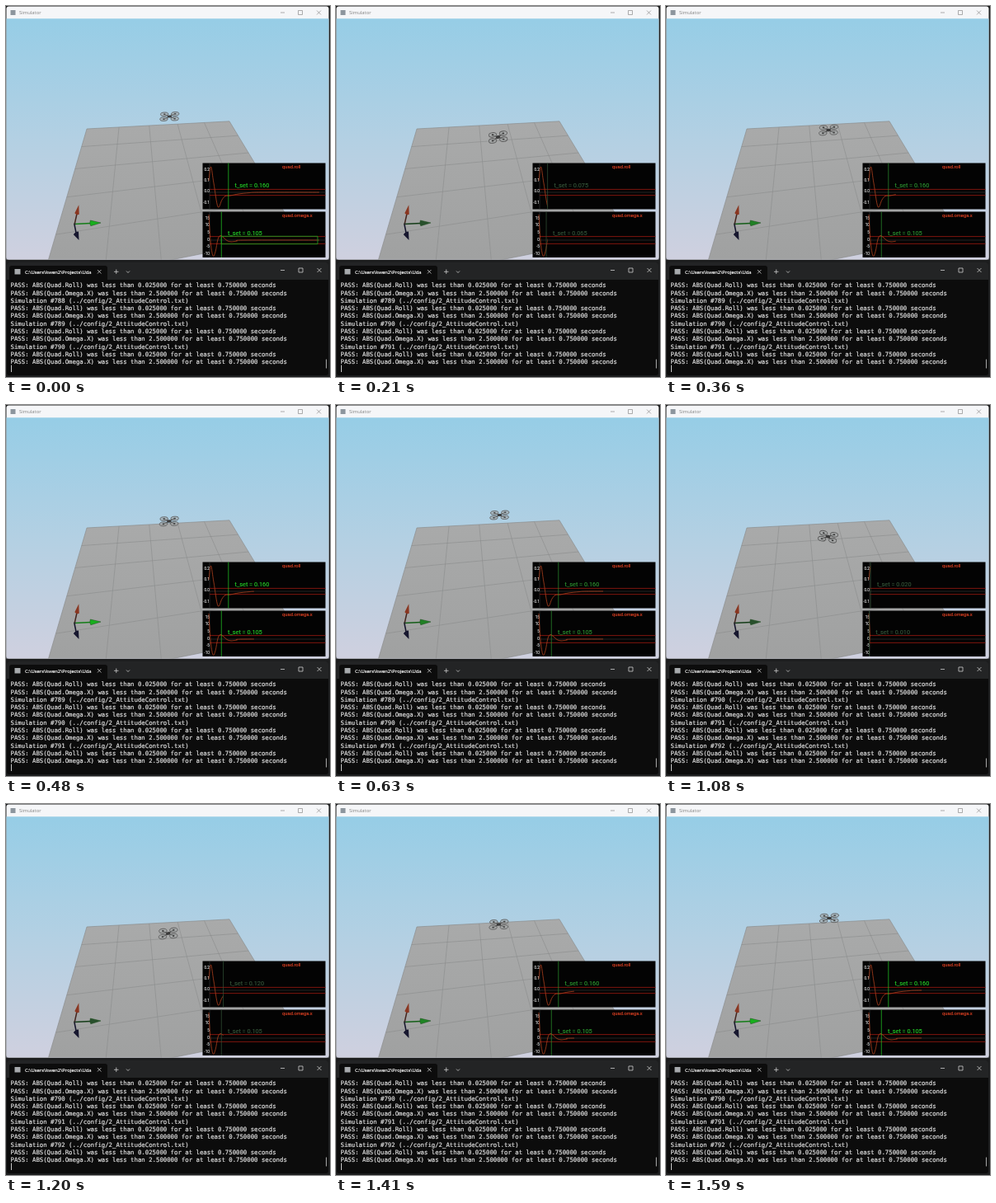
Recreate the animation shown at these times as an HTML page. Size 393x450 px, loop 1620 ms.

```html
<!DOCTYPE html>
<html lang="en">
<head>
<meta charset="utf-8">
<title>Simulator</title>
<style>
html, body { margin: 0; width: 100%; height: 100%; overflow: hidden; background: #1d1e1f; }
svg { display: block; width: 393px; height: 450px; }
.ui { font: 5.9px "Open Sans", "Noto Sans", sans-serif; }
.tab { fill: #f2f2f2; stroke: #f2f2f2; stroke-width: .2; }
.term { font: 7.33px "DejaVu Sans Mono", "Noto Sans Mono", monospace; fill: #dadada; stroke: #dadada; stroke-width: .22; white-space: pre; }
.plot { font: 7.3px Roboto, Inter, sans-serif; stroke-width: .15; }
.tick { font: 4.6px Roboto, Inter, sans-serif; fill: #dcdcdc; stroke: #dcdcdc; stroke-width: .12; text-anchor: end; }
.name { font: 5.8px Roboto, Inter, sans-serif; fill: #cc3c20; stroke: #cc3c20; stroke-width: .2; }
</style>
</head>
<body>
<svg id="stage" viewBox="0 0 393 450">
  <defs>
    <linearGradient id="sky" x1="0" y1="0" x2="0" y2="1">
      <stop offset="0" stop-color="#96cde6"/>
      <stop offset=".5" stop-color="#b3d0e3"/>
      <stop offset="1" stop-color="#cfd0df"/>
    </linearGradient>
    <linearGradient id="slab" gradientUnits="userSpaceOnUse" x1="0" y1="140" x2="0" y2="307">
      <stop offset="0" stop-color="#a9aaaa"/>
      <stop offset="1" stop-color="#a0a1a1"/>
    </linearGradient>
    <clipPath id="view"><rect x=".5" y="15.300" width="391" height="292.200"/></clipPath>
    <clipPath id="drawn"><rect id="reveal" x="238" y="190" width="0" height="116"/></clipPath>
    <clipPath id="panels"><path d="M238.500 190.600H387.500V246.500H238.500ZM238.500 249.500H387.500V305H238.500Z"/></clipPath>
  </defs>

  <rect x=".5" y=".4" width="391" height="307.100" rx="3" fill="#f5f6f8"/>
  <rect x=".5" y="15.300" width="391" height="292.200" fill="url(#sky)"/>
  <rect x="5.500" y="5" width="6" height="6" fill="#8d969e"/>
  <text class="ui" x="16" y="10.300" fill="#808080">Simulator</text>
  <path d="M333 8h5M354.500 5.500h5v5h-5zM377 5.500l5 5m0-5l-5 5" fill="none" stroke="#8c8c8c" stroke-width=".7"/>

  <g clip-path="url(#view)">
    <path id="floor" fill="url(#slab)" stroke="#858686" stroke-width=".6"/>
    <path id="grid" fill="none" stroke="#8a8b8b" stroke-width=".6"/>
    <path d="M83.300 264L86 252" stroke="#45261f" stroke-width="1.500"/>
    <path d="M88.300 241.300L83.300 251.300Q85.500 254 88.700 252.800Z" fill="#8a3620"/>
    <path d="M83 265L85 275" stroke="#14142c" stroke-width="1.500"/>
    <path d="M88.500 284L81.800 277.200Q83.800 273.700 88 273.500Z" fill="#17172f"/>
    <path id="shaft" d="M83 264.500L103 263.500" stroke-width="1.700"/>
    <path id="cone" d="M115 263L102.300 260Q101 264 102.800 266.800Z" stroke="#1c4a1c" stroke-width=".5"/>
    <circle cx="83.300" cy="264.500" r="1.200" fill="#2c2c2c"/>
    <g id="drone"></g>
  </g>

  <path d="M238.500 190.600H387.500V246.500H238.500ZM238.500 249.500H387.500V305H238.500Z" fill="#030303"/>
  <g id="plots" clip-path="url(#panels)"></g>

  <rect x="1" y="311" width="390" height="137" rx="3" fill="#0c0c0c"/>
  <path d="M1 332V314a3 3 0 0 1 3-3H388a3 3 0 0 1 3 3V332Z" fill="#232425"/>
  <path d="M4 332V318a3 3 0 0 1 3-3H120a3 3 0 0 1 3 3V332Z" fill="#0c0c0c"/>
  <rect x="10.500" y="319" width="7" height="6.500" fill="#a6a9ac"/>
  <text class="ui tab" x="23" y="324.500">C:\Users\kwen2\Projects\Uda</text>
  <path d="M111 320l4.500 4.500m0-4.500l-4.500 4.500M131 322.300h5.500M133.750 319.500v5.500M146 321.500l2 2l2-2M333 320.500h5M355 318h5v5h-5zM377.500 318l5 5m0-5l-5 5" fill="none" stroke="#ccc" stroke-width=".8"/>
  <g id="log" class="term"></g>
  <path d="M6.500 435.500v8.500" stroke="#ddd" stroke-width=".9"/>
  <path d="M388.500 428.500v11" stroke="#a0a0a0" stroke-width="1.100"/>
</svg>

<script>
const $ = id => document.getElementById(id);
const mix = (a, b, f) => a + (b - a) * f;
const clamp = (v, lo, hi) => Math.min(hi, Math.max(lo, v));

function add(parent, tag, attrs, text) {
  const el = document.createElementNS('http://www.w3.org/2000/svg', tag);
  for (const key in attrs) el.setAttribute(key, attrs[key]);
  if (text !== undefined) el.textContent = text;
  return parent.appendChild(el);
}

function along(keys, x) {
  let i = 1;
  while (i < keys.length - 1 && keys[i][0] < x) i++;
  const [a, b] = [keys[i - 1], keys[i]];
  return mix(a[1], b[1], clamp((x - a[0]) / (b[0] - a[0]), 0, 1));
}

// Smooth curve through points
function spline(p) {
  let d = `M${p[0]}`;
  for (let i = 0; i < p.length - 1; i++) {
    const a = p[i - 1] || p[i], b = p[i], c = p[i + 1], e = p[i + 2] || c;
    d += `C${b[0] + (c[0] - a[0]) / 6},${b[1] + (c[1] - a[1]) / 6} ` +
         `${c[0] - (e[0] - b[0]) / 6},${c[1] - (e[1] - b[1]) / 6} ${c}`;
  }
  return d;
}

// Maps the unit square onto four corners in perspective
function perspective([x0, y0], [x1, y1], [x2, y2], [x3, y3]) {
  const ax = x1 - x2, bx = x3 - x2, sx = x0 - x1 + x2 - x3;
  const ay = y1 - y2, by = y3 - y2, sy = y0 - y1 + y2 - y3;
  const den = ax * by - bx * ay;
  const g = (sx * by - bx * sy) / den, h = (ax * sy - sx * ay) / den;
  return (u, v) => {
    const w = 1 + g * u + h * v;
    const x = x0 + (x1 - x0 + g * x1) * u + (x3 - x0 + h * x3) * v;
    const y = y0 + (y1 - y0 + g * y1) * u + (y3 - y0 + h * y3) * v;
    return `${x / w},${y / w}`;
  };
}
const floorAt = perspective([98, 149], [271, 139.8], [354, 277], [42, 340]);
$('floor').setAttribute('d', `M${floorAt(0, 0)}L${floorAt(1, 0)}L${floorAt(1, 1)}L${floorAt(0, 1)}Z`);
let lines = '';
for (let i = 1; i < 5; i++) {
  const f = i / 5;
  lines += `M${floorAt(f, 0)}L${floorAt(f, 1)}M${floorAt(0, f)}L${floorAt(1, f)}`;
}
$('grid').setAttribute('d', lines);

// Drone
const drone = $('drone');
add(drone, 'path', { d: 'M-6.500 -3L6.500 3M6.500 -3L-6.500 3', stroke: '#444', 'stroke-width': 1.2 });
for (const [x, y] of [[-6, -3], [7, -3], [-7, 3], [6.3, 3]]) {
  add(drone, 'ellipse', { cx: x, cy: y, rx: 4.7, ry: 2.3, fill: '#a0a3a3', 'fill-opacity': .6, stroke: '#5a5a5a', 'stroke-width': .8 });
  add(drone, 'ellipse', { cx: x, cy: y, rx: 1.3, ry: .8, fill: '#3c3c3c' });
}
add(drone, 'ellipse', { cx: 0, cy: 0, rx: 2.6, ry: 1.6, fill: '#3a3a3a' });

// Plots
const plots = $('plots');
const X0 = 245, SCALE = 155;
const rollCurve = [[246, 212], [248.5, 195], [252, 215], [257, 243.5], [262, 235], [266, 230.5],
  [272, 230], [282, 228], [295, 226.6], [310, 226], [387, 226]];
const omegaCurve = [[246, 253], [248, 285], [251, 303], [254, 298], [257, 283], [260, 278.5],
  [264, 281], [268, 284.5], [273, 286], [280, 285], [290, 284], [387, 284]];

function makePlot(top, zero, band, ticks, step, name, nameX, curve) {
  add(plots, 'path', { d: `M247 ${top}v56M247 ${zero}H388`, stroke: '#3c3c3c', 'stroke-width': .6 });
  add(plots, 'path', { d: `M247 ${zero - band}H388M247 ${zero + band}H388`, stroke: '#9c1a11', 'stroke-width': .8 });
  ticks.forEach((label, i) => add(plots, 'text', { class: 'tick', x: 246.8, y: top + 8.5 + i * step }, label));
  add(plots, 'text', { class: 'name', x: nameX, y: top + 6.3 }, name);
  add(plots, 'path', { d: spline(curve), fill: 'none', stroke: '#b0401e', 'stroke-width': .8, 'clip-path': 'url(#drawn)' });
  const line = add(plots, 'path', { 'stroke-width': .7 });
  const text = add(plots, 'text', { class: 'plot' });
  return (settle, color, y) => {
    const x = X0 + settle * SCALE;
    line.setAttribute('d', `M${x} ${top - 1}v57`);
    line.setAttribute('stroke', color);
    text.setAttribute('x', x + 7.8);
    text.setAttribute('y', y);
    text.setAttribute('fill', color);
    text.setAttribute('stroke', color);
    text.textContent = `t_set = ${settle.toFixed(3)}`;
  };
}
const setRoll = makePlot(191, 226, 3.6, ['0.2', '0.1', '0.0', '-0.1'], 13.4, 'quad.roll', 335, rollCurve);
const setOmega = makePlot(250, 284, 4.4, ['15', '10', '5', '0', '-5', '-10'], 8.7, 'quad.omega.x', 335, omegaCurve);
const passBox = add(plots, 'path', { d: 'M261.300 279.300H378V288.700H261.300Z', fill: 'none', stroke: '#1f9a1f', 'stroke-width': .9 });

// Terminal
const pass = (what, limit) => `PASS: ABS(Quad.${what}) was less than ${limit} for at least 0.750000 seconds`;
const rows = [];
for (let i = 0; i < 11; i++) {
  const kind = i % 3;
  const text = kind === 0 ? pass('Roll', '0.025000') : kind === 1 ? pass('Omega.X', '2.500000') : '';
  rows.push(add($('log'), 'text', { x: 5.5, y: 341.4 + i * 9.27 }, text));
}

// Step index -> simulated seconds, then strength of the greens
const clock = [[0, .87], [2, .93], [3, 0], [5, .075], [13, .36], [17, .51], [24, .76], [28, .92],
  [29, .02], [32, .12], [43, .42]];
const glow = [[0, 1], [2, 1], [3, 0], [5, 0], [13, 1], [17, .5], [24, .4], [28, .8], [29, 0], [32, 0], [43, 1]];
const height = [[0, 160], [.075, 159], [.12, 157], [.36, 141], [.42, 138.5], [.51, 133.5], [.64, 131],
  [.76, 130.5], [.87, 134], [.93, 136]];
const LOOP = 1620, STEPS = 44;
const snap = v => Math.round(v * 200) / 200;

function draw(ms) {
  const slot = Math.floor((ms % LOOP) / 30);
  const k = Math.floor(slot * STEPS / 54);
  const t = along(clock, k), g = along(glow, k);
  const green = `rgb(${mix(54, 36, g)},${mix(86, 210, g)},${mix(58, 40, g)})`;
  const head = X0 + t * SCALE;

  $('reveal').setAttribute('width', head - 238);
  setRoll(snap(Math.min(t, .16)), green, 219.7);
  setOmega(snap(clamp(t - .01, 0, .105)), green, 277.7);
  passBox.setAttribute('visibility', t >= .855 ? 'visible' : 'hidden');

  $('shaft').setAttribute('stroke', `rgb(20,${mix(60, 125, g)},24)`);
  $('cone').setAttribute('fill', `rgb(${mix(40, 24, g)},${mix(80, 175, g)},${mix(44, 30, g)})`);

  const y = along(height, t);
  const tilt = (226 - along(rollCurve, Math.max(head, 246))) * .4 - 2;
  const x = mix(198.5, 196.5, clamp((y - 131) / 28, 0, 1));
  const squash = mix(.95, 1.2, (y - 130) / 30);
  drone.setAttribute('transform', `translate(${x} ${y}) rotate(${tilt}) scale(1 ${squash})`);

  const run = k < 3 ? 790 : k < 29 ? 791 : 792;
  for (let i = 0; i < 3; i++) {
    rows[2 + i * 3].textContent = `Simulation #${run - 2 + i} (../config/2_AttitudeControl.txt)`;
  }
}

const start = performance.now();
function tick() {
  draw(performance.now() - start);
  requestAnimationFrame(tick);
}
draw(0);
requestAnimationFrame(tick);
</script>
</body>
</html>
```
